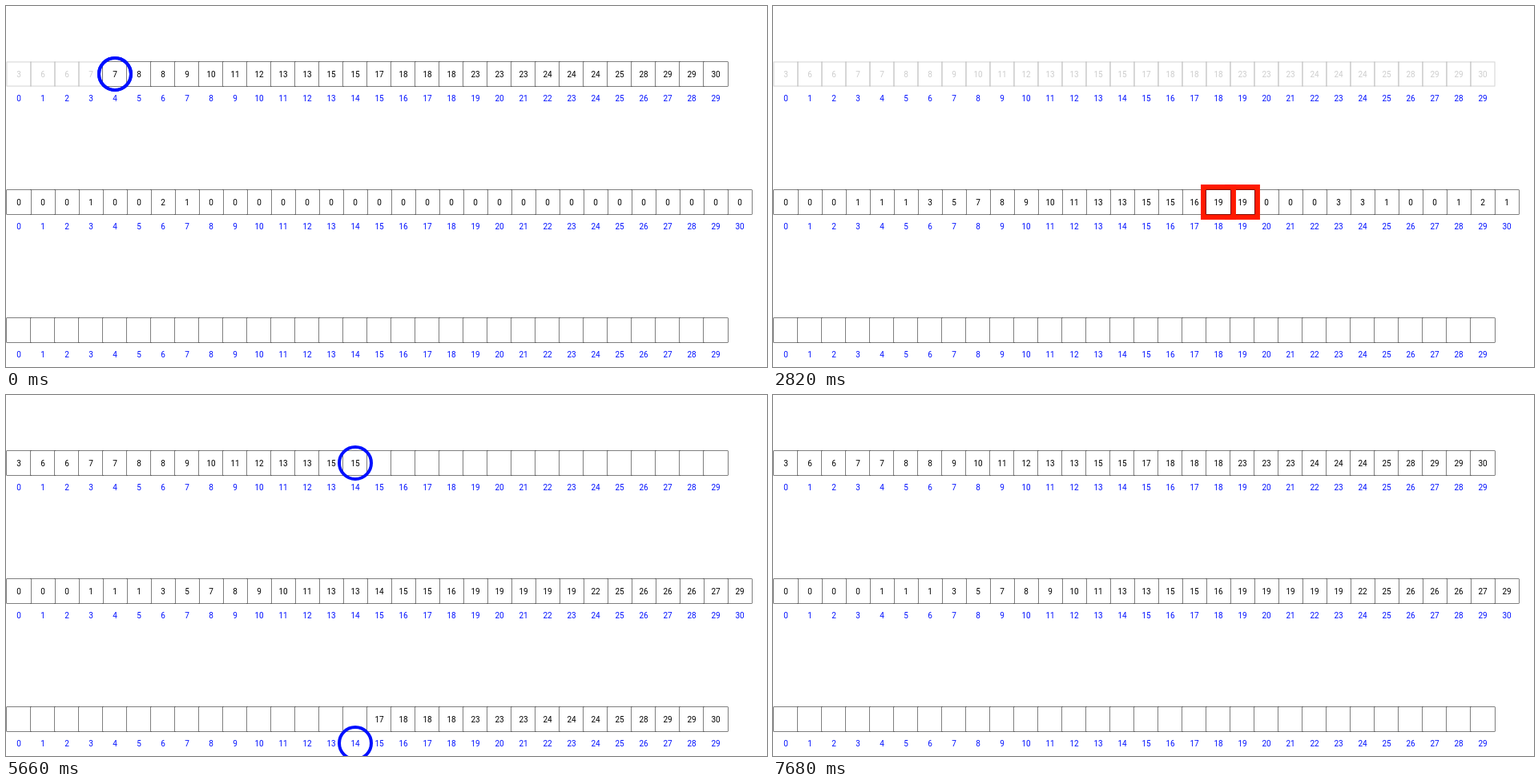
An HTML page with a canvas for the animation above (7.79 s loop, 950x451 px).

```html
<!DOCTYPE html>
<html lang="en">
<head>
<meta charset="utf-8">
<title>Counting sort</title>
<style>
  html, body { margin: 0; width: 100%; height: 100%; overflow: hidden; background: #fff; }
  canvas { display: block; }
</style>
</head>
<body>
<canvas id="stage" width="950" height="451"></canvas>
<script>
const ctx = document.getElementById('stage').getContext('2d');
const LOOP = 7790, TICKS = 66, LEAD = 18;
const CELL = 30, FADED = 0.2, LABEL_DY = 30;
const INPUT_Y = 85, COUNT_Y = 245, OUTPUT_Y = 405;
const BLUE = '#0010ff', RED = '#ff1a00';

// First tick of each phase, and elements handled per tick
const SUM_START = 14, PLACE_START = 31, COPY_START = 64, END = 65;
const COUNT_RATE = 17 / 9, SUM_RATE = 1.8, PLACE_RATE = 10 / 11;

// The values being sorted
const data = [3, 6, 6, 7, 7, 8, 8, 9, 10, 11, 12, 13, 13, 15, 15,
  17, 18, 18, 18, 23, 23, 23, 24, 24, 24, 25, 28, 29, 29, 30];
const N = data.length, SLOTS = 31;

const centerX = i => CELL * i + 16;

function tally(n) {
  const counts = new Array(SLOTS).fill(0);
  for (let i = 0; i < n; i++) counts[data[i]]++;
  return counts;
}

function accumulate(counts, last) {
  for (let i = 1; i <= last; i++) counts[i] += counts[i - 1];
  return counts;
}

function countPhase(s, tick) {
  const pos = 4.1 + tick * COUNT_RATE, i = Math.floor(pos);
  const counted = pos - i >= 0.5;
  s.faded = i;
  s.counts = tally(counted ? i + 1 : i);
  s.circles = [[i, INPUT_Y], counted ? [data[i], COUNT_Y + LABEL_DY] : [i, INPUT_Y]];
}

function sumPhase(s, tick) {
  const pos = 1.6 + (tick - SUM_START) * SUM_RATE, i = Math.floor(pos);
  s.faded = N;
  s.counts = accumulate(tally(N), pos - i >= 0.5 ? i : i - 1);
  s.marked = i;
  s.spread = Math.max(3, 7 - 0.46 * Math.abs(tick - 22.8));
}

function placePhase(s, tick) {
  const pos = Math.min(N, 0.4 + (tick - PLACE_START) * PLACE_RATE);
  const done = Math.floor(pos), phase = pos - done;
  const move = i => {
    s.output[s.counts[data[i]]] = data[i];
    s.input[i] = '';
  };
  s.counts = accumulate(tally(N), SLOTS - 1);
  for (let i = N - 1; i >= N - done; i--) {
    s.counts[data[i]]--;
    move(i);
  }
  if (done === N) return;

  const i = N - 1 - done, value = data[i];
  let target = [i, INPUT_Y];
  if (phase >= 0.25) {
    s.counts[value]--;
    target = phase < 0.8
      ? [value, COUNT_Y + LABEL_DY]
      : [s.counts[value], OUTPUT_Y + LABEL_DY];
  }
  if (phase >= 0.9) move(i);
  s.circles = [[i, INPUT_Y], target];
}

function stateAt(tick) {
  const s = {
    input: data.slice(), output: new Array(N).fill(''), counts: null,
    faded: 0, countAlpha: 1, marked: 0, spread: 0, circles: []
  };
  if (tick < SUM_START) countPhase(s, tick);
  else if (tick < PLACE_START) sumPhase(s, tick);
  else if (tick < COPY_START) placePhase(s, tick);
  else {
    placePhase(s, Infinity);
    if (tick < END) {
      s.countAlpha = FADED;
    } else {
      s.input = data.slice();
      s.output.fill('');
    }
  }
  return s;
}

function text(value, i, y, color) {
  ctx.fillStyle = color;
  ctx.fillText(value, centerX(i), y + 4);
}

function cell(i, y, value, alpha, spread = 0) {
  const x = CELL * i + 1, top = y - CELL / 2;
  ctx.globalAlpha = alpha;
  if (spread) {
    const d = spread + 0.5;
    ctx.fillStyle = RED;
    ctx.fillRect(x - d, top - d, CELL + 2 * d, CELL + 2 * d);
  }
  // the fill hides the inner half of the outline
  ctx.strokeStyle = '#000';
  ctx.lineWidth = 1;
  ctx.strokeRect(x, top, CELL, CELL);
  ctx.fillStyle = '#fff';
  ctx.fillRect(x, top, CELL, CELL);
  text(value, i, y, '#000');
  ctx.globalAlpha = 1;
}

function labels(n, y) {
  for (let i = 0; i < n; i++) text(i, i, y + LABEL_DY, BLUE);
}

function ring([i, y]) {
  ctx.strokeStyle = BLUE;
  ctx.lineWidth = 4;
  ctx.beginPath();
  ctx.arc(centerX(i), y, 20, 0, Math.PI * 2);
  ctx.stroke();
}

function draw(tick) {
  const s = stateAt(tick);
  ctx.fillStyle = '#fff';
  ctx.fillRect(0, 0, 950, 451);
  ctx.font = '10px Roboto, "Liberation Sans", sans-serif';
  ctx.textAlign = 'center';
  ctx.textBaseline = 'alphabetic';

  for (let i = 0; i < N; i++) {
    cell(i, INPUT_Y, s.input[i], i < s.faded ? FADED : 1);
    cell(i, OUTPUT_Y, s.output[i], 1);
  }
  for (let i = SLOTS - 1; i >= 0; i--) cell(i, COUNT_Y, s.counts[i], s.countAlpha);
  labels(N, INPUT_Y);
  labels(SLOTS, COUNT_Y);
  labels(N, OUTPUT_Y);

  if (s.marked) {
    for (const i of [s.marked, s.marked - 1]) cell(i, COUNT_Y, s.counts[i], 1, s.spread);
  }
  s.circles.forEach(ring);
}

const start = performance.now();
let shown = -1;

function update() {
  const t = (performance.now() - start) % LOOP;
  const tick = Math.min(END, Math.floor((t + LEAD) * TICKS / LOOP));
  if (tick !== shown) draw(shown = tick);
  requestAnimationFrame(update);
}
update();
</script>
</body>
</html>
```
